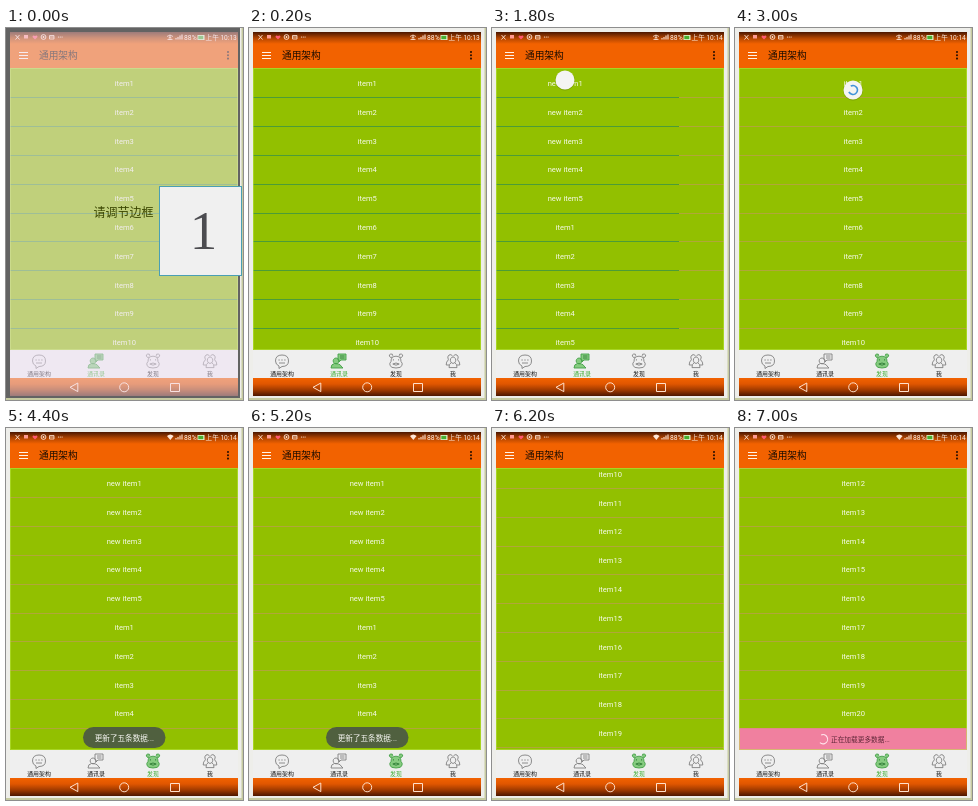
Write an HTML page with a canvas that moves like this. It is 237x372 px and loops after 8000 ms.

```html
<!DOCTYPE html>
<html lang="zh-CN">
<head>
<meta charset="utf-8">
<style>
html, body { margin: 0; width: 100%; height: 100%; overflow: hidden; background: #eeeeea; }
canvas { display: block; width: 237px; height: 372px; }
</style>
</head>
<body>
<canvas id="stage"></canvas>
<script>
const W = 237, H = 372, LOOP = 8000, STEP = 200;
const LEFT = 4, RIGHT = 232, TOP = 40, BOTTOM = 322, MID = 118;
const FIRST = 41, ROW = 28.8, END = ROW * 16;
const FONT = "Roboto, 'Noto Sans CJK SC', 'Noto Sans CJK', sans-serif";
const GREEN = '#92c000', ORANGE = '#f26200';
const cv = document.getElementById('stage'), c = cv.getContext('2d');
const dpr = window.devicePixelRatio || 1;
cv.width = W * dpr;
cv.height = H * dpr;

const clamp = (v, a = 0, b = 1) => Math.min(b, Math.max(a, v));
const ramp = (t, a, b) => clamp((t - a) / (b - a));

function box(x, y, w, h, fill) {
  c.fillStyle = fill;
  c.fillRect(x, y, w, h);
}

function text(s, x, y, size, fill, align = 'center', family = FONT, weight = 400) {
  c.font = weight + ' ' + size + 'px ' + family;
  c.textAlign = align;
  c.textBaseline = 'middle';
  c.fillStyle = fill;
  c.fillText(s, x, y);
}

function shape(d, stroke, fill, width = 0.9) {
  const p = new Path2D(d);
  if (fill) { c.fillStyle = fill; c.fill(p); }
  if (stroke) { c.strokeStyle = stroke; c.lineWidth = width; c.stroke(p); }
}

function dot(x, y, r, fill) {
  c.beginPath();
  c.arc(x, y, r, 0, 7);
  c.fillStyle = fill;
  c.fill();
}

function arc(x, y, r, from, sweep, color, width) {
  c.beginPath();
  c.arc(x, y, r, from, from + sweep);
  c.strokeStyle = color;
  c.lineWidth = width;
  c.stroke();
}

function fade(y0, y1, stops) {
  const g = c.createLinearGradient(0, y0, 0, y1);
  stops.forEach((s, i) => g.addColorStop(i / (stops.length - 1), s));
  box(LEFT, y0, RIGHT - LEFT, y1 - y0, g);
}

function statusBar(t) {
  fade(4, 16, ['#4a1600', '#b04400', ORANGE]);
  const pale = '#ffe6d6';
  shape('M9.5 7L13.5 11.5M13.5 7L9.5 11.5', pale);
  box(18, 7, 4, 3.5, '#ff9a90');
  shape('M29 11.5L26.5 9Q26.5 6.5 29 8Q31.5 6.5 31.5 9Z', null, '#ff5a70');
  arc(37.5, 9, 2.4, 0, 7, pale, 0.9);
  dot(37.5, 9, 0.9, pale);
  shape('M43.5 7.5H48V11H43.5ZM43.5 9H48', pale, null, 0.8);
  [52.5, 54.3, 56.1].forEach(x => dot(x, 9, 0.6, pale));
  if (t < 3400) {
    shape('M161 8.5Q164 5.5 167 8.5M162.5 10Q164 8 165.5 10M164 7V12M161.5 11.5H166.5', pale, null, 0.8);
  } else {
    shape('M161 8Q164.3 5 167.6 8L164.3 12Z', null, pale);
  }
  shape('M170 11.5V10M172 11.5V9M174 11.5V7.5M176 11.5V6.5', pale, null, 1.1);
  text('88%', 184.3, 9.9, 6.8, '#fff0e4');
  box(191.5, 7, 7, 5, '#e8f5d0');
  box(192.3, 7.8, 5, 3.4, '#48b030');
  text(t < 1400 ? '上午 10:13' : '上午 10:14', 230.8, 9.9, 6.6, '#fff0e4', 'right');
}

function toolbar() {
  box(LEFT, 15.9, RIGHT - LEFT, TOP - 15.9, ORANGE);
  [24, 27, 30].forEach(y => box(13, y, 9, 1, '#fff4e8'));
  text('通用架构', 33, 28.2, 9.7, '#1c0d00', 'left', FONT, 500);
  [24, 27.3, 30.6].forEach(y => dot(222, y, 1.05, '#2a1000'));
}

const ICONS = [
  ['M-6.5 0Q-6.5 -6 0 -6Q6.5 -6 6.5 0Q6.5 5.5 0 5.5L-3 7.5L-3 5Q-6.5 3.5 -6.5 0Z',
   'M-3.6 -1h1.4M-.7 -1h1.4M2.2 -1h1.4M-3 2H3'],
  ['M-1 -7H7V-1H2L0 1V-1H-1ZM-3 -3A2.9 2.9 0 1 0 -2.9 -3ZM-8 7Q-8 3 -4.5 2.5Q1 2.5 2 5L4 7Z',
   'M1 -5H5.5M1 -3H5.5'],
  ['M-3.6 -4.2A1.7 1.7 0 1 1 -3.2 -5.2M3.6 -4.2A1.7 1.7 0 1 0 3.2 -5.2M-5 .5Q-5 -4.8 0 -4.8Q5 -4.8 5 .5Q6.8 2 6 4.5Q5 7 0 7Q-5 7 -6 4.5Q-6.8 2 -5 .5Z',
   'M-2.6 -1.8v1.3M2.6 -1.8v1.3M-3.2 3Q0 1 3.2 3Q0 5.4 -3.2 3Z'],
  ['M-.4 -5Q-2 -7.2 -4 -6Q-6.2 -4.5 -4.6 -1.2Q-7 .8 -6.8 4H-4M.4 -5Q2 -7.2 4 -6Q6.2 -4.5 4.6 -1.2Q7 .8 6.8 4H4M0 -4A2.7 3.2 0 1 0 .1 -4M-1.8 1.6Q-4.2 3.2 -4 6.6H4Q4.2 3.2 1.8 1.6',
   '']
];

function tabs(active) {
  box(LEFT, BOTTOM, RIGHT - LEFT, 28, '#efefef');
  ['通用架构', '通讯录', '发现', '我'].forEach((label, i) => {
    const x = 33 + i * 57, on = i === active;
    c.save();
    c.translate(x, 333);
    shape(ICONS[i][0], on ? '#45a048' : '#808080', on ? '#86cc80' : null);
    shape(ICONS[i][1], on ? '#2f7d36' : '#808080');
    c.restore();
    text(label, x, 346.3, 5.9, on ? '#3fae35' : '#181818', 'center', FONT, 500);
  });
}

function navBar() {
  fade(350, 368, [ORANGE, '#e05600', '#a03a00', '#4c1600']);
  const pale = '#ffe0cc';
  shape('M64 359.3L71.8 355V363.6Z', pale, null, 1);
  arc(118.2, 359.3, 4.5, 0, 7, pale, 1);
  shape('M164.5 355.5H173.5V363.5H164.5Z', pale, null, 1);
}

function spinner(x, y, r, t, strength) {
  if (r <= 0) return;
  dot(x, y + 0.6, r + 0.4, 'rgba(60,80,0,.25)');
  dot(x, y, r, '#f4f4f2');
  if (strength <= 0) return;
  c.globalAlpha = strength;
  arc(x, y, r * 0.47, -2.1 + (t - 3000) / STEP * 1.2, 4.8, '#3f92d8', 1.6);
  c.globalAlpha = 1;
}

// One list page; the five added rows come first once it has refreshed.
function page(x, line, fresh, scroll, t) {
  c.save();
  c.translate(x, 0);
  box(LEFT, TOP, RIGHT - LEFT, BOTTOM - TOP, GREEN);
  for (let i = 0; i < (fresh ? 25 : 20); i++) {
    const y = FIRST + i * ROW - scroll;
    if (y < TOP - ROW || y > BOTTOM) continue;
    const name = fresh ? (i < 5 ? 'new item' + (i + 1) : 'item' + (i - 4)) : 'item' + (i + 1);
    text(name, MID + 0.2, y + 14.8, 7.6, '#f6faea');
    box(LEFT, Math.floor(y + ROW), RIGHT - LEFT, 1, line);
  }
  if (fresh) {
    const y = FIRST + 25 * ROW - scroll;
    if (y < BOTTOM) {
      box(LEFT, y, RIGHT - LEFT, 23, '#f0809f');
      arc(88, y + 11, 4.6, -2 + (t - 7000) / STEP * 1.1, 4.3, '#ffe4ec', 1.1);
      text('正在加载更多数据...', 96, y + 11.5, 6.7, '#5c2436', 'left');
    }
  }
  c.restore();
}

function lists(t) {
  const shift = t < 1800 ? 0 : t < 2000 ? 45 : t < 2200 ? 190 : 228;
  c.save();
  c.beginPath();
  c.rect(LEFT, TOP, RIGHT - LEFT, BOTTOM - TOP);
  c.clip();
  if (shift < 228) {
    page(-shift, '#4c9c38', t >= 1400, 0, t);
    if (t >= 400) {
      const y = 31 + 31 * ramp(t, 200, 800) - 10 * ramp(t, 1400, 1800);
      spinner(MID - shift, y, 9.5, t, t < 1600 ? ramp(t, 400, 800) : 0);
    }
  }
  if (shift > 0) {
    const scroll = END * (1 - Math.pow(1 - ramp(t, 5200, 6600), 1.8));
    page(228 - shift, '#b0a63a', t >= 4000, scroll, t);
    if (t >= 2600 && t < 4400) {
      const y = 31 + 31 * ramp(t, 2400, 2800);
      spinner(MID, y, 9.5 * (1 - ramp(t, 4000, 4400)), t, ramp(t, 2500, 2800));
    }
  }
  c.strokeStyle = 'rgba(190,235,70,.5)';
  c.lineWidth = 1;
  c.strokeRect(LEFT + 0.5, TOP + 0.5, RIGHT - LEFT - 1, BOTTOM - TOP - 1);
  c.restore();
}

function toast(t) {
  const a = ramp(t, 4000, 4400) * (1 - ramp(t, 5400, 5800));
  if (!a) return;
  c.globalAlpha = a;
  c.beginPath();
  c.roundRect(77, 299, 82.5, 21, 10.5);
  c.fillStyle = '#50603f';
  c.fill();
  text('更新了五条数据...', 118.3, 310.3, 7.6, '#f8f8f4');
  c.globalAlpha = 1;
}

function countdown() {
  box(LEFT, 4, RIGHT - LEFT, 364, 'rgba(240,226,246,.5)');
  text('请调节边框', 117.5, 185.5, 12, '#3a4600');
  box(153, 158, 83, 90, '#4a9fb4');
  box(154, 159, 81, 88, '#f0f0f0');
  text('1', 197.5, 207, 55, '#4c4c50', 'center', "'Liberation Serif', serif");
}

function draw(t) {
  c.setTransform(dpr, 0, 0, dpr, 0, 0);
  box(0, 0, W, H, '#c6cba0');
  box(0, 0, 235.5, 370, '#eeeeea');
  if (t < STEP) box(0, 0, 234, 370, '#636363');
  statusBar(t);
  toolbar();
  lists(t);
  tabs(t < 2000 ? 1 : 2);
  navBar();
  toast(t);
  if (t < STEP) countdown();
}

function tick(now) {
  let t = Math.floor(now % LOOP / STEP) * STEP;
  if (t > 6600) t = t < 7000 ? 6600 : 7000;
  draw(t);
  requestAnimationFrame(tick);
}
draw(0);
requestAnimationFrame(tick);
</script>
</body>
</html>
```
